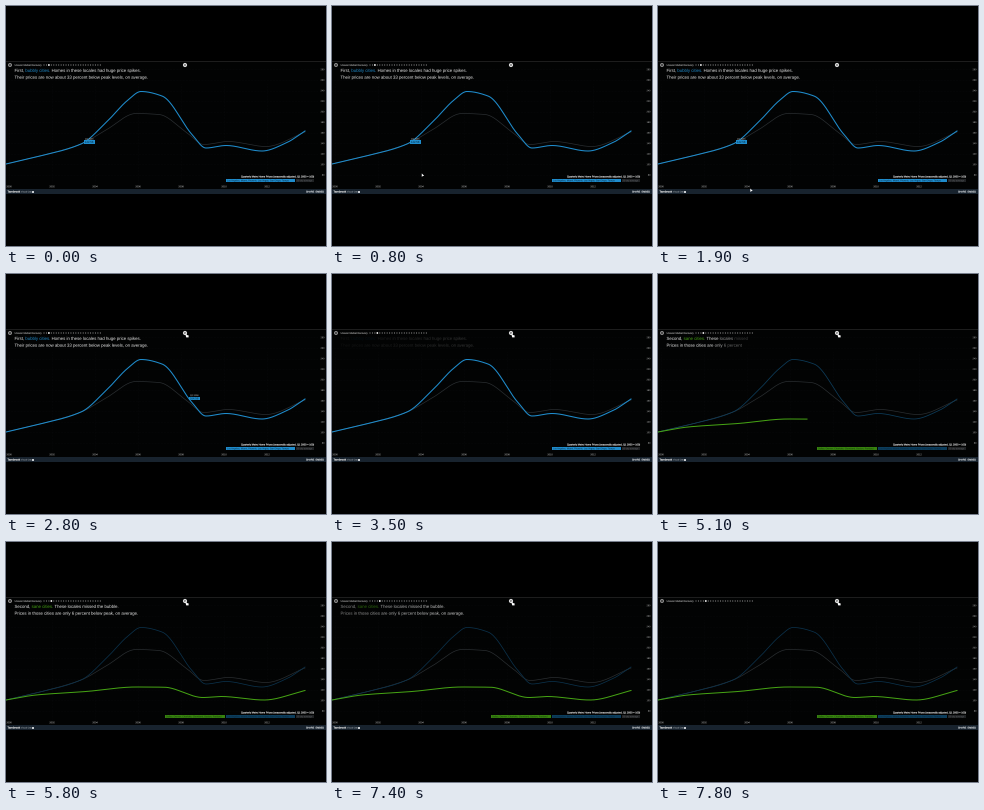
These frames come from a looping animation (320x240 px, 8000 ms). A matplotlib script:

```python
import numpy as np
import matplotlib.pyplot as plt
from matplotlib.animation import FuncAnimation
from matplotlib.colors import to_rgb
from matplotlib.patches import Circle, PathPatch, Polygon, Rectangle
from matplotlib.textpath import TextPath
from matplotlib.transforms import Affine2D

W, H, DPI = 320, 240, 80
STEP, FRAMES = 100, 80
PT = 72 / DPI

BLUE, GREEN, WHITE = "#1f8ccc", "#46a414", "#ececec"
DIM_BLUE = "#0b324c"
BASE_Y, ROW = 158.4, 10.55
YEAR_X, YEAR_W = 3, 21.5

fig = plt.figure(figsize=(W / DPI, H / DPI), dpi=DPI, facecolor="black")
ax = fig.add_axes([0, 0, 1, 1])
ax.set_xlim(0, W)
ax.set_ylim(H, 0)
ax.axis("off")


# ---- helpers ----
def glyphs(s, size, weight="normal"):
    return TextPath((0, 0), s, size=size,
                    prop={"family": "Liberation Sans", "weight": weight})


def right_edge(s, size):
    return glyphs(s, size).get_extents().x1


def place(patch, x, y):
    patch.set_transform(Affine2D().scale(1, -1).translate(x, y) + ax.transData)


def label(x, y, s, size, color, align="left", weight="normal", edge=0, z=4):
    path = glyphs(s, size, weight)
    if align != "left":
        x -= path.get_extents().x1 * (1 if align == "right" else 0.5)
    patch = PathPatch(path, fc=color, ec=color, lw=edge, zorder=z)
    place(patch, x, y)
    return ax.add_patch(patch)


def box(x0, y0, x1, y1, color, z=2):
    return ax.add_patch(Rectangle((x0, y0), x1 - x0, y1 - y0,
                                  fc=color, lw=0, zorder=z))


def dot(x, y, r, color, z=4):
    return ax.add_patch(Circle((x, y), r, fc=color, lw=0, zorder=z))


def curve(*keys):
    """Smooth line through key points that never overshoots them."""
    px, py = np.array(keys, float).T
    h = np.diff(px)
    s = np.diff(py) / h
    a, b = s[:-1], s[1:]
    same = a * b > 0
    inner = np.where(same, 2 * a * b / np.where(same, a + b, 1), 0)
    m = np.concatenate([s[:1], inner, s[-1:]])

    x = np.arange(px[0], px[-1] + 0.5, 0.5)
    k = np.clip(np.searchsorted(px, x, side="right") - 1, 0, len(h) - 1)
    u = (x - px[k]) / h[k]
    rise = u * u * (3 - 2 * u)
    y = (py[k] + (py[k + 1] - py[k]) * rise
         + h[k] * u * (1 - u) * (m[k] * (1 - u) - m[k + 1] * u))
    return x, y


def progress(t, start, length):
    return min(max((t - start) / length, 0), 1)


def ease(p):
    return 2 * p * p if p < 0.5 else 1 - 2 * (1 - p) ** 2


def mix(a, b, p):
    return tuple((1 - p) * np.array(to_rgb(a)) + p * np.array(to_rgb(b)))


# ---- price curves ----
shared = [(0, 158), (30, 151), (75, 138)]
bubbly = curve(*shared, (101, 115.5), (122, 94), (135, 85.5), (156, 90),
               (186, 128.5), (200, 142), (220, 139.5), (256, 145),
               (280, 137), (299, 125))
average = curve(*shared, (100, 124), (130, 107.5), (153, 108.5), (180, 126),
                (198, 138.5), (222, 135.5), (260, 140.5), (299, 126))
sane = curve((0, 158), (30, 153), (80, 149.5), (130, 145), (158, 145.2),
             (197, 155.5), (215, 154.5), (258, 158), (299, 148.5))

# ---- page and axes ----
box(0, 55, W, 188, "#020303", z=0)
box(0, 55, W, 56, "#1d1d1d", z=1)
for k in range(11):
    y = BASE_Y + ROW - k * ROW
    ax.plot([0, 312], [y, y], color="#0b0c0d", lw=0.5, ls=":", zorder=1)
    label(318.3, y + 0.8, str(80 + 20 * k), 2.3, "#c4c4c4", "right")
for year in range(0, 13, 2):
    x = YEAR_X + YEAR_W * year
    ax.plot([x, x], [78, 177], color="#0b0c0d", lw=0.5, ls=":", zorder=1)
    label(x, 181.3, str(2000 + year), 2.4, "#d8d8d8", "center")

# header
dot(4, 59, 2, "#8c8c8c")
dot(4, 59, 1, "#3a3a3a")
label(8.6, 59.9, "Uneven Market Recovery", 2.4, "#b4b4b4", edge=0.05)
dot(179, 59, 2.1, "#d8d8d8")
dot(179, 59, 0.8, "#555555")
DOT_X, DOT_GAP = 38, 2.45
for k in range(24):
    dot(DOT_X + DOT_GAP * k, 59, 0.55, "#a0a0a0")
page = dot(DOT_X, 59, 0.9, "#f0f0f0", z=5)

# footer
box(0, 183, W, 188, "#18232e")
label(1.5, 186.5, "Tarnbrook", 2.6, "#e8e8e8", weight="bold", edge=0.1)
label(14.8, 186.5, "Visual Data", 2.3, "#c4cad0")
box(26, 184.5, 28, 186.5, "#c8ccd0", z=4)
label(318, 186.5, "SHARE  EMBED", 2.4, "#e2e6ea", "right", edge=0.1)

# legend
label(308, 171.4, "Quarterly Metro Home Prices (seasonally adjusted, Q1 2000 = 100)",
      2.45, "#e4e4e4", "right", edge=0.1)
green_key = box(159, 173, 219, 176, "#37820f")
blue_key = box(220, 173, 289, 176, BLUE)
box(289.5, 173, 308, 176, "#202224")
green_names = label(160, 175.3, "Dallas, Denver, Charlotte, Cleveland, Boston, Portland",
                    2.3, "#123806")
label(221, 175.3, "Los Angeles, Miami, Phoenix, Las Vegas, San Diego, Tampa",
      2.3, "#06243a")
label(290.5, 175.3, "20-city average", 2.3, "#5c6064")

# lines
ax.plot(*average, color="#2a2e31", lw=0.7 * PT, zorder=2)
blue_line, = ax.plot(*bubbly, color=BLUE, zorder=3)
green_line, = ax.plot([], [], color=GREEN, lw=PT, zorder=4)


# ---- captions, faded word by word ----
def caption(lines, accent):
    size, left, width = 4.33, 8.5, 135
    bar = right_edge("l", size)
    words = []
    for row, text in enumerate(lines):
        prefix = ""
        for k, word in enumerate(text.split()):
            x = right_edge(prefix + "l", size) - bar
            color = accent if row == 0 and k in (1, 2) else WHITE
            patch = label(left + x, 65.9 + 6.8 * row, word, size, color, z=5)
            words.append((patch, x / width))
            prefix += word + " "
    return words


first = caption(["First, bubbly cities. Homes in these locales had huge price spikes.",
                 "Their prices are now about 33 percent below peak levels, on average."],
                BLUE)
second = caption(["Second, sane cities. These locales missed the bubble.",
                  "Prices in those cities are only 6 percent below peak, on average."],
                 GREEN)


def fade_out(t, begin, u):
    return (1 - progress(t, begin + 100 * u, 400)) ** 2


# ---- tooltip and cursor ----
tip_box = box(0, 0, 10.5, 3.4, BLUE, z=6)
tip_value = label(0, 0, "0", 2.8, "#04263c", z=7)
tip_date = label(0, 0, "0", 2.2, "#c8c8c8", z=7)
tooltip = [tip_box, tip_value, tip_date]

ARROW = np.array([(0, 0), (0, 3.4), (1, 2.7), (2.4, 2.4)])
HAND = np.array([(0, 0), (1, 0), (1.6, 1.4), (3.4, 1.8), (3.4, 3.8), (1, 3.8)])
cursor = ax.add_patch(Polygon(ARROW, fc="#ffffff", lw=0, zorder=9))


def move_tooltip(x):
    y = np.interp(x, *bubbly) - 0.5
    quarter = int((x - YEAR_X) / YEAR_W * 4)
    value = 100 + (BASE_Y - y) / ROW * 20
    tip_box.set_xy((x, y - 1.7))
    tip_value.set_path(glyphs(f"{value:.2f}", 2.8))
    place(tip_value, x + 0.8, y + 1)
    tip_date.set_path(glyphs(f"Q{quarter % 4 + 1} {2000 + quarter // 4}", 2.2))
    place(tip_date, x + 1, y - 2.3)


def cursor_at(t):
    hover, rest, button = map(np.array, [(85, 139), (92.3, 182.5), (179.2, 59.6)])
    if t < 1900:
        return hover + (rest - hover) * ease(progress(t, 100, 1200))
    return rest + (button - rest) * ease(progress(t, 1900, 800))


def draw(i):
    t = i * STEP

    move_tooltip(78 + 105 * ease(progress(t, 1900, 900)))
    for part in tooltip:
        part.set_visible(t < 3300)
    cursor.set_xy((HAND if t >= 2700 else ARROW) + cursor_at(t))
    cursor.set_visible(t > 0)

    number = 2 + (t >= 3300) + (t >= 7400)
    page.center = (DOT_X + DOT_GAP * number, 59)

    for patch, u in first:
        patch.set_alpha(fade_out(t, 3200, u))
    for patch, u in second:
        shown = progress(t, 4700 + 700 * u, 200)
        patch.set_alpha(shown * fade_out(t, 7300, u))

    dim = progress(t, 4300, 900)
    blue_line.set_color(mix(BLUE, DIM_BLUE, dim))
    blue_line.set_linewidth((1.05 - 0.3 * dim) * PT)

    sane_on = t >= 4400
    green_key.set_visible(sane_on)
    green_names.set_visible(sane_on)
    blue_key.set_facecolor("#0c3d5c" if sane_on else BLUE)

    n = int(len(sane[0]) * ease(progress(t, 4400, 1400)))
    green_line.set_data(sane[0][:n], sane[1][:n])
    return []


anim = FuncAnimation(fig, draw, frames=FRAMES, interval=STEP,
                     init_func=lambda: draw(0), repeat=True, repeat_delay=0)
plt.show()
```
